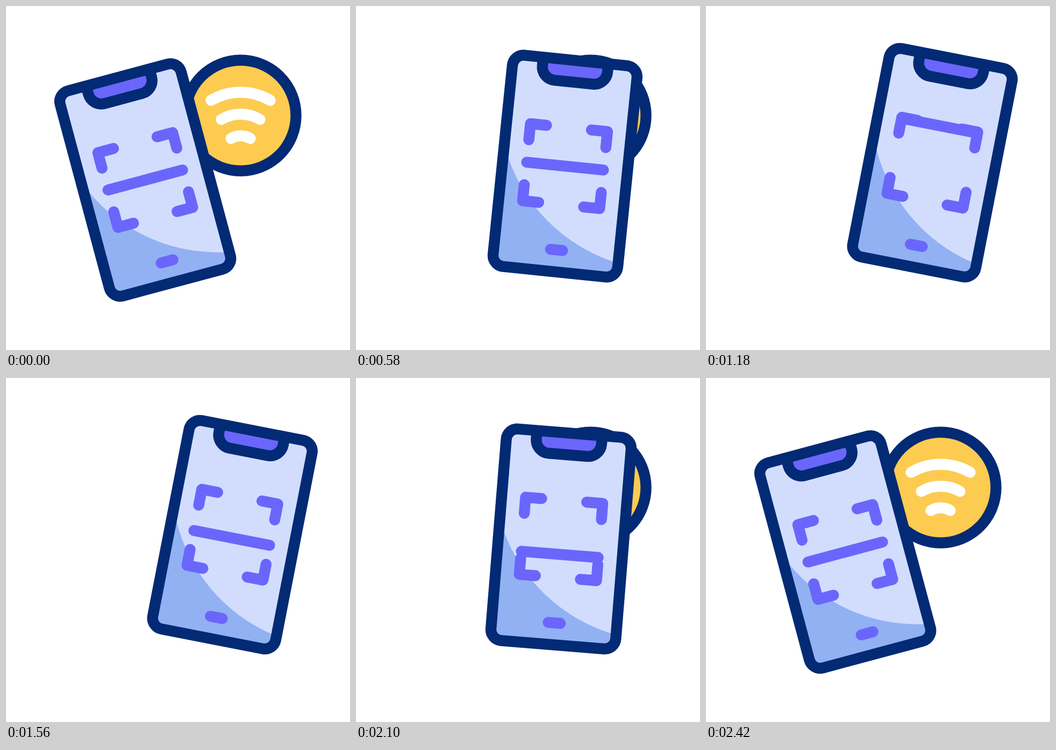
Recreate the animation shown at these times as an HTML page. Size 640 by 640 pixels, loop 2.8 s.

```html
<!DOCTYPE html>
<html lang="en">
<head>
<meta charset="utf-8">
<title>Contactless scan</title>
<style>
  html, body { margin: 0; height: 100%; overflow: hidden; background: #fff; }
  svg { display: block; width: 100vw; height: 100vh; }
  .line { fill: none; stroke-width: 20.4; stroke-linecap: round; stroke-linejoin: round; }
  .navy { stroke: #032a74; stroke-width: 20.4; }
  .violet { stroke: #6a66fb; }
  .white { stroke: #fff; }
</style>
</head>
<body>
<svg viewBox="0 0 640 640">
  <clipPath id="screen"><rect x="-116.5" y="-197.5" width="233" height="395" rx="20.6"/></clipPath>

  <circle class="navy" cx="436.5" cy="203.7" r="103" fill="#fdcb50"/>
  <g class="line white">
    <path d="M381.5 175.5A108 108 0 0 1 491.5 175.5"/>
    <path d="M400.5 211A71.6 71.6 0 0 1 472.5 211"/>
    <path d="M418.5 246.5A35 35 0 0 1 454.5 246.5"/>
  </g>

  <g id="phone">
    <g clip-path="url(#screen)">
      <rect x="-120" y="-200" width="240" height="400" fill="#92b1f3"/>
      <circle cx="175.3" cy="-135.8" r="311" fill="#d2ddfe"/>
    </g>
    <path class="navy" fill="#6a66fb" d="M-60.9 -197.5V-182A25 25 0 0 0 -35.9 -157H35.9A25 25 0 0 0 60.9 -182V-197.5"/>
    <rect class="navy" x="-116.5" y="-197.5" width="233" height="395" rx="20.6" fill="none"/>
    <g class="line violet">
      <path d="M-72 -42V-72H-42M42 -72H72V-42M72 42V72H42M-42 72H-72V42M-11.3 156.7H11.3"/>
      <path id="bar" d="M-71.8 0H71.8"/>
    </g>
  </g>
</svg>
<script>
const LOOP = 2800;
const phone = document.getElementById('phone');
const bar = document.getElementById('bar');

const mix = (a, b, k) => a + (b - a) * k;
const span = (t, from, to) => Math.min(1, Math.max(0, (t - from) / (to - from)));
const smooth = k => k * k * (3 - 2 * k);

// Cubic Bezier easing with flat ends: control points (x1, 0) and (x2, 1).
const bezier = (x1, x2) => x => {
  let lo = 0, hi = 1;
  for (let i = 0; i < 24; i++) {
    const s = (lo + hi) / 2, r = 1 - s;
    if (3 * x1 * s * r * r + 3 * x2 * s * s * r + s ** 3 < x) lo = s; else hi = s;
  }
  return smooth((lo + hi) / 2);
};
const easeThere = bezier(0.55, 0.4);
const easeBack = bezier(0.73, 0.68);

function draw(t) {
  const k = easeThere(span(t, 200, 800)) - easeBack(span(t, 1800, 2400));
  phone.setAttribute('transform',
    `translate(${mix(259.1, 421.2, k)} ${mix(323.7, 291.5, k)}) rotate(${mix(-15, 11, k)})`);

  const scan = -smooth(span(t, 820, 1180)) + 2 * smooth(span(t, 1180, 1900)) - smooth(span(t, 1900, 2260));
  bar.setAttribute('transform', `translate(0 ${70 * scan})`);
}

const start = performance.now();
function tick() {
  draw((performance.now() - start) % LOOP);
  requestAnimationFrame(tick);
}
tick();
</script>
</body>
</html>
```
